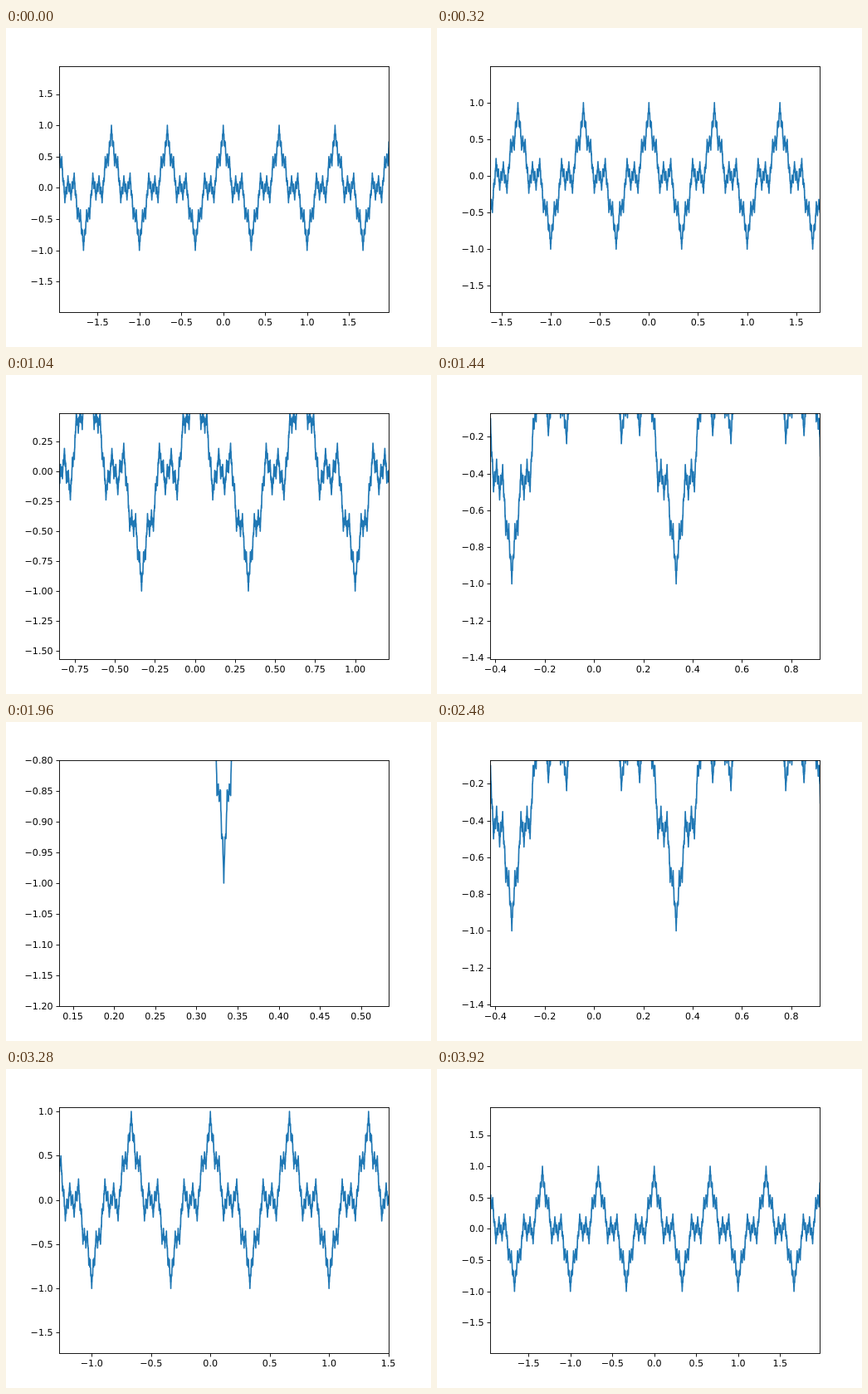
An HTML page that plays this animation: 512 px wide and 384 px high, repeating every 3960 ms.

```html
<!DOCTYPE html>
<html lang="en">
<head>
<meta charset="utf-8">
<title>Zoom into a fractal curve</title>
<style>
  html, body { margin: 0; width: 100%; height: 100%; overflow: hidden; background: #fff; }
  svg { display: block; }
  text { font: 11.111px "DejaVu Sans", sans-serif; fill: #000; text-rendering: geometricPrecision; }
  .thin { stroke: #000; stroke-width: 0.889; fill: none; }
  #curve { stroke: #1f77b4; stroke-width: 1.667; stroke-linejoin: round; fill: none; vector-effect: non-scaling-stroke; }
</style>
</head>
<body>
<svg width="512" height="384" viewBox="0 0 512 384">
  <clipPath id="plot"><rect x="64" y="46" width="397" height="296"/></clipPath>
  <g clip-path="url(#plot)"><path id="curve"/></g>
  <path id="ticks" class="thin"/>
  <rect class="thin" x="64.5" y="46.5" width="397" height="296"/>
  <g id="labels"></g>
</svg>
<script>
const LEFT = 64, TOP = 46.08, WIDTH = 396.8, HEIGHT = 295.68, BOTTOM = TOP + HEIGHT;
const STEP_MS = 40, STEPS = 50, FRAMES = 2 * STEPS - 1;
const FOCUS = { x: 1 / 3, y: -1, r: 0.2 };

const curve = document.getElementById("curve");
const ticks = document.getElementById("ticks");
const labels = document.getElementById("labels");

// Weierstrass sum: 2^-n cos(3^n pi x)
function weierstrass(x) {
  let sum = 0;
  for (let n = 1; n <= 20; n++) sum += Math.cos(3 ** n * Math.PI * x) / 2 ** n;
  return sum;
}

function buildCurve() {
  const half = 6000, pts = [];
  for (let i = -half; i <= half; i++) {
    const x = 2 * i / half;
    pts.push(x.toFixed(6) + " " + weierstrass(x).toFixed(5));
  }
  curve.setAttribute("d", "M" + pts.join("L"));
}

// Smallest round step that gives at most nine intervals
function tickStep(range) {
  const raw = range / 9;
  const scale = 10 ** Math.floor(Math.log10(raw));
  return scale * [1, 2, 2.5, 5, 10].find(s => s * scale >= raw - 1e-9);
}

function tickList(lo, hi) {
  const step = tickStep(hi - lo), list = [];
  const digits = Math.abs(step * 10 - Math.round(step * 10)) < 1e-6 ? 1 : 2;
  const last = Math.floor(hi / step + 1e-6);
  for (let i = Math.ceil(lo / step - 1e-6); i <= last; i++) {
    const v = i * step;
    list.push({ v, text: (v < 0 ? "\u2212" : "") + Math.abs(v).toFixed(digits) });
  }
  return list;
}

const label = (x, y, anchor, text) =>
  `<text x="${x.toFixed(2)}" y="${y}" text-anchor="${anchor}">${text}</text>`;

function draw(k) {
  const p = (k + 1) / STEPS;
  const mix = (a, b) => a + (b - a) * p;
  const x0 = mix(-2, FOCUS.x - FOCUS.r), x1 = mix(2, FOCUS.x + FOCUS.r);
  const y0 = mix(-2, FOCUS.y - FOCUS.r), y1 = mix(2, FOCUS.y + FOCUS.r);
  const sx = WIDTH / (x1 - x0), sy = HEIGHT / (y1 - y0);

  curve.setAttribute("transform",
    `matrix(${sx} 0 0 ${-sy} ${LEFT - x0 * sx} ${BOTTOM + y0 * sy})`);

  let marks = "", html = "";
  for (const { v, text } of tickList(x0, x1)) {
    const x = LEFT + (v - x0) * sx;
    marks += `M${Math.round(x) + 0.5} 342.5v4`;
    html += label(x, 358, "middle", text);
  }
  for (const { v, text } of tickList(y0, y1)) {
    const y = BOTTOM - (v - y0) * sy;
    marks += `M64.5 ${Math.round(y) + 0.5}h-4`;
    html += label(56.6, Math.round(y + 3.9), "end", text);
  }
  ticks.setAttribute("d", marks);
  labels.innerHTML = html;
}

let shown = -1;
const start = performance.now();

function tick(now) {
  const i = Math.floor(Math.max(0, now - start) / STEP_MS) % FRAMES;
  const k = Math.min(i, FRAMES - 1 - i);
  if (k !== shown) draw(shown = k);
  requestAnimationFrame(tick);
}

buildCurve();
tick(start);
</script>
</body>
</html>
```
